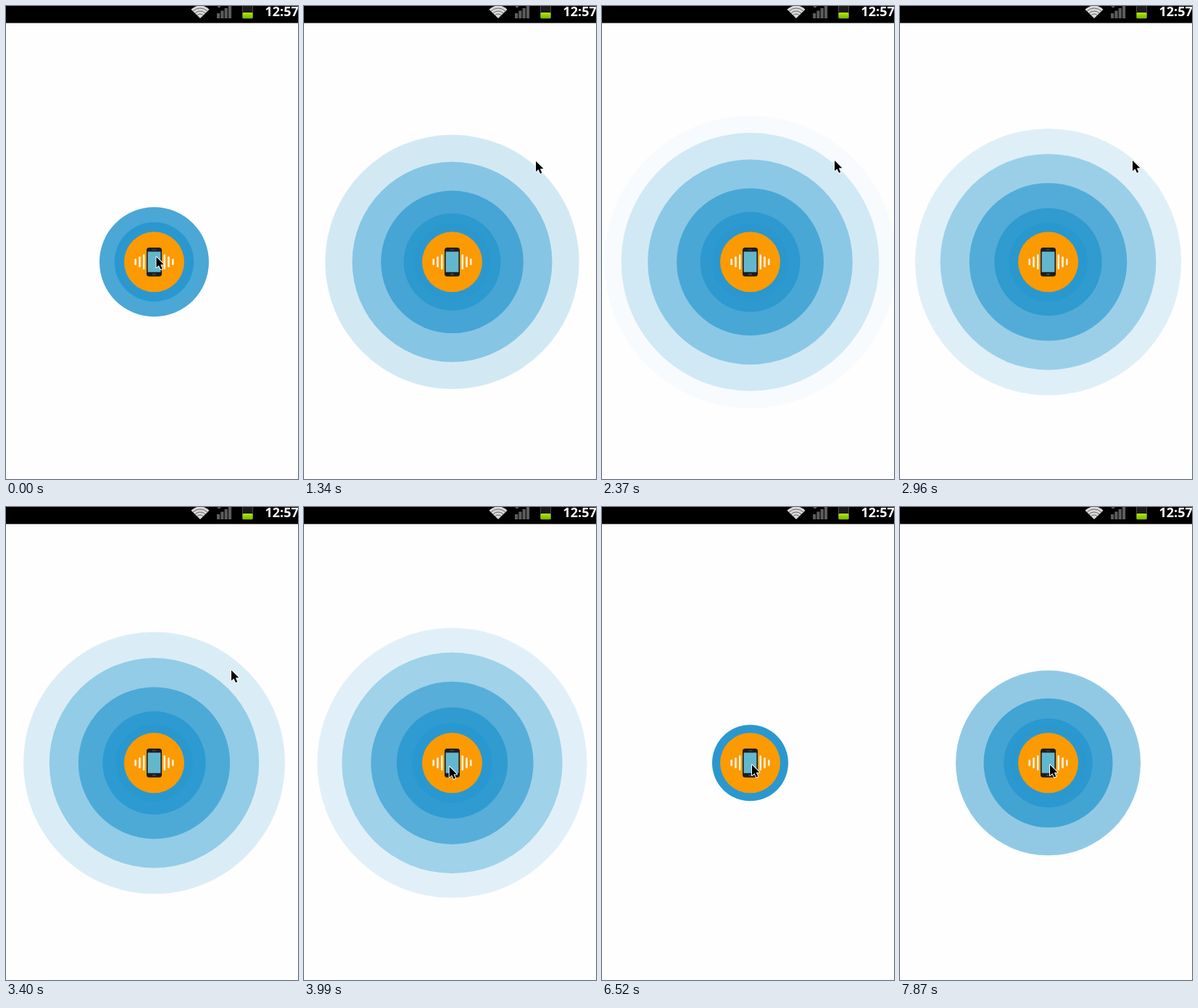
Write an HTML page with a canvas that moves like this. It is 403x652 px and loops after 8000 ms.

```html
<!DOCTYPE html>
<html lang="en">
<head>
<meta charset="utf-8">
<title>Ripple button</title>
<style>
  html, body { margin: 0; width: 100%; height: 100%; overflow: hidden; background: #fefefe; }
  canvas { display: block; }
</style>
</head>
<body>
<canvas id="stage" width="403" height="652"></canvas>
<script>
const ctx = document.getElementById('stage').getContext('2d');
const LOOP = 8000, STEP = 148.1, LAST_STEP = 53;
const CENTER = { x: 204.5, y: 352.8 };

// Six staggered ripples; each grows to four times its size while fading out.
const RIPPLES = 6, DEGREES_PER_MS = 0.0603, BASE_RADIUS = 51.65, GROWTH = 3, MIN_ALPHA = 0.03;
const RUNS = [{ from: -766, to: 4400 }, { from: 6376, to: LOOP }];

// Pointer rest points: [time, x, y]
const POINTER = [
  [0, 207.5, 346], [150, 207.5, 346], [1150, 320, 214], [2300, 321, 213], [3300, 321, 213],
  [3900, 200.7, 358], [4740, 200.7, 358], [5260, 286, 476], [5770, 207, 355.5], [LOOP, 207, 355.5]
];

function disc(x, y, radius, color) {
  ctx.fillStyle = color;
  ctx.beginPath();
  ctx.arc(x, y, radius, 0, Math.PI * 2);
  ctx.fill();
}

function box(x, y, w, h, color, radius = 0) {
  ctx.fillStyle = color;
  ctx.beginPath();
  ctx.roundRect(x, y, w, h, radius);
  ctx.fill();
}

function polygon(points, color) {
  ctx.fillStyle = color;
  ctx.beginPath();
  points.forEach(([x, y]) => ctx.lineTo(x, y));
  ctx.closePath();
  ctx.fill();
}

function drawWifi() {
  const x = 268, y = 17, start = -Math.PI * 0.755, end = -Math.PI * 0.245;
  ctx.fillStyle = '#d8d8d8';
  ctx.beginPath();
  ctx.moveTo(x, y);
  ctx.arc(x, y, 17.5, start, end);
  ctx.fill();
  ctx.strokeStyle = '#555';
  ctx.lineWidth = 0.9;
  for (const radius of [6, 10, 14]) {
    ctx.beginPath();
    ctx.arc(x, y, radius, start, end);
    ctx.stroke();
  }
}

function drawStatusBar() {
  box(0, 0, 403, 23.6, '#000');
  drawWifi();
  for (let i = 0; i < 4; i++) {
    const height = 7 + i * 3.5;
    box(291 + i * 5.3, 17 - height, 4.2, height, '#5c5c5c');
  }
  polygon([[291, 0], [297, 0], [294, 3]], '#555');
  box(326, -4, 15, 21.5, '#4a4a4a', 2);
  box(327, -3, 13, 12, '#1a1a1a');
  const charge = ctx.createLinearGradient(0, 9, 0, 17);
  charge.addColorStop(0, '#b4e60a');
  charge.addColorStop(1, '#74b800');
  box(326.5, 9, 14, 8, charge, 1.5);
  ctx.fillStyle = '#fff';
  ctx.font = 'bold 18px "Open Sans", "Noto Sans", sans-serif';
  ctx.fillText('12:57', 357.5, 14);
}

function drawRipples(t) {
  const run = RUNS.find(({ from, to }) => t >= from && t < to);
  if (!run) return;
  for (let i = 0; i < RIPPLES; i++) {
    const phase = Math.max(0, (t - run.from) * DEGREES_PER_MS - i * 180 / RIPPLES) % 180;
    const progress = (1 - Math.cos(phase * Math.PI / 180)) / 2;
    const alpha = 1 - progress;
    if (alpha < MIN_ALPHA) continue;
    ctx.globalAlpha = alpha;
    disc(CENTER.x, CENTER.y, BASE_RADIUS * (1 + GROWTH * progress), '#2a98cf');
  }
  ctx.globalAlpha = 1;
}

function drawButton() {
  disc(CENTER.x, CENTER.y, 41.5, '#fc9a02');
  [[25.8, 9], [20, 15], [14.2, 21]].forEach(([offset, height]) => {
    for (const side of [-1, 1]) {
      box(CENTER.x + side * offset - 1.3, CENTER.y - height / 2, 2.6, height, '#fff4e0', 1.3);
    }
  });
  box(194, 333, 21, 39.7, '#1d1d1f', 3.5);
  box(195.6, 338.6, 17.8, 28.2, '#63b7cd');
  box(201.5, 335.2, 6, 1.2, '#444', 0.6);
  box(202, 368.7, 5, 2, '#444', 1);
}

function drawPointer(t) {
  const next = Math.max(1, POINTER.findIndex(([time]) => time >= t));
  const [t0, x0, y0] = POINTER[next - 1], [t1, x1, y1] = POINTER[next];
  const u = (t - t0) / (t1 - t0), ease = u * u * (3 - 2 * u);
  ctx.save();
  ctx.translate(x0 + (x1 - x0) * ease, y0 + (y1 - y0) * ease);
  ctx.strokeStyle = '#fff';
  ctx.lineWidth = 2;
  ctx.lineJoin = 'round';
  polygon([[0, 0], [0, 14.5], [3.4, 11.4], [6, 17], [8.3, 16], [5.8, 10.5], [10.3, 10.3]], '#000');
  ctx.stroke();
  ctx.fill();
  ctx.restore();
}

function draw(now) {
  // The picture advances in even steps, like a low frame-rate recording.
  const step = Math.min(LAST_STEP, Math.floor((now % LOOP + 15) / STEP));
  const t = step * STEP;
  box(0, 0, 403, 652, '#fefefe');
  drawRipples(t);
  drawButton();
  drawStatusBar();
  drawPointer(t);
}

const begin = performance.now();
function tick() {
  draw(performance.now() - begin);
  requestAnimationFrame(tick);
}
tick();
</script>
</body>
</html>
```
